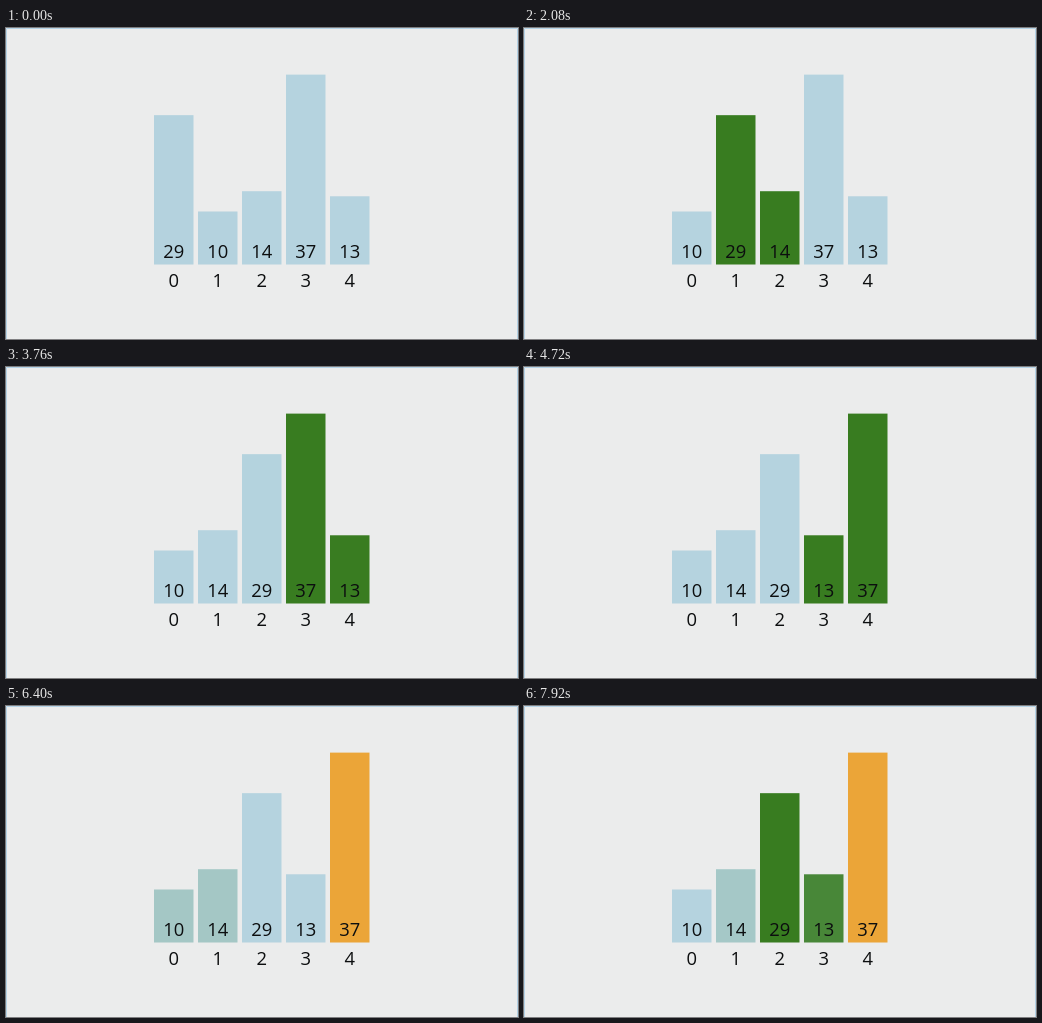
These frames come from a looping animation (512 px wide and 311 px high, 8000 ms). An HTML page:

```html
<!DOCTYPE html>
<html lang="en">
<head>
<meta charset="utf-8">
<title>Bubble sort</title>
<style>
  html, body { margin: 0; width: 100%; height: 100%; overflow: hidden; background: #ebecec; }
  svg { display: block; width: 512px; height: 311px; }
  text { font: 18.4px "Open Sans", "Noto Sans", sans-serif; text-anchor: middle; fill: #0c0e0f; }
</style>
</head>
<body>
<svg id="stage" viewBox="0 0 512 311">
  <rect width="512" height="311" fill="#ebecec"/>
  <path d="M0.5 311V0.5H511.5V311" fill="none" stroke="#b4d2e6"/>
</svg>
<script>
const LOOP = 8000, FIRST = -36, STEP = 704, FADE = 311;
const LEFT = 148, PITCH = 44, WIDTH = 39.5, BASE = 236.5;
const BLUE = [181, 211, 223], GREEN = [56, 124, 32], ORANGE = [235, 165, 56];
const values = [29, 10, 14, 37, 13];

// [compared slots, swap them?, number of sorted slots at the end]
const steps = [
  [[0, 1]], [[0, 1], true],
  [[1, 2]], [[1, 2], true],
  [[2, 3]],
  [[3, 4]], [[3, 4], true],
  [[], false, 1], [[], false, 1],
  [[0, 1], false, 1], [[1, 2], false, 1], [[2, 3], false, 1]
];

// Each state holds slot and colour per value, in drawing order.
function buildStates() {
  const order = values.slice();
  const snapshot = (active, sorted) => values.map(v => {
    const slot = order.indexOf(v);
    const color = slot >= order.length - sorted ? ORANGE : active.includes(slot) ? GREEN : BLUE;
    return { slot, color };
  });
  const states = [snapshot([], 0)];
  for (const [active, swap = false, sorted = 0] of steps) {
    if (swap) {
      const [a, b] = active;
      [order[a], order[b]] = [order[b], order[a]];
    }
    states.push(snapshot(active, sorted));
  }
  return states;
}

const stage = document.getElementById("stage");

function add(parent, tag, attrs, text = "") {
  const el = document.createElementNS("http://www.w3.org/2000/svg", tag);
  for (const key in attrs) el.setAttribute(key, attrs[key]);
  el.textContent = text;
  return parent.appendChild(el);
}

const bars = values.map(v => {
  const group = add(stage, "g", {});
  const height = 2.3 + 5.07 * v;
  const rect = add(group, "rect", { y: BASE - height, width: WIDTH, height });
  add(group, "text", { x: WIDTH / 2, y: 229.5 }, v);
  return { group, rect };
});
values.forEach((_, i) => add(stage, "text", { x: LEFT + i * PITCH + WIDTH / 2, y: 259.4 }, i));

const states = buildStates();
const mix = (a, b, p) => a + (b - a) * p;
const ease = p => p < 0.5 ? 4 * p ** 3 : 1 - 4 * (1 - p) ** 3;

function draw(time) {
  const index = Math.min(Math.floor((time - FIRST) / STEP), steps.length - 1);
  const p = ease(Math.min((time - FIRST - index * STEP) / FADE, 1));
  bars.forEach(({ group, rect }, i) => {
    const from = states[index][i], to = states[index + 1][i];
    const x = LEFT + PITCH * mix(from.slot, to.slot, p);
    const rgb = from.color.map((c, k) => Math.round(mix(c, to.color[k], p)));
    group.setAttribute("transform", `translate(${x} 0)`);
    rect.setAttribute("fill", `rgb(${rgb})`);
  });
}

const start = performance.now();
function tick() {
  draw((performance.now() - start) % LOOP);
  requestAnimationFrame(tick);
}
tick();
</script>
</body>
</html>
```
